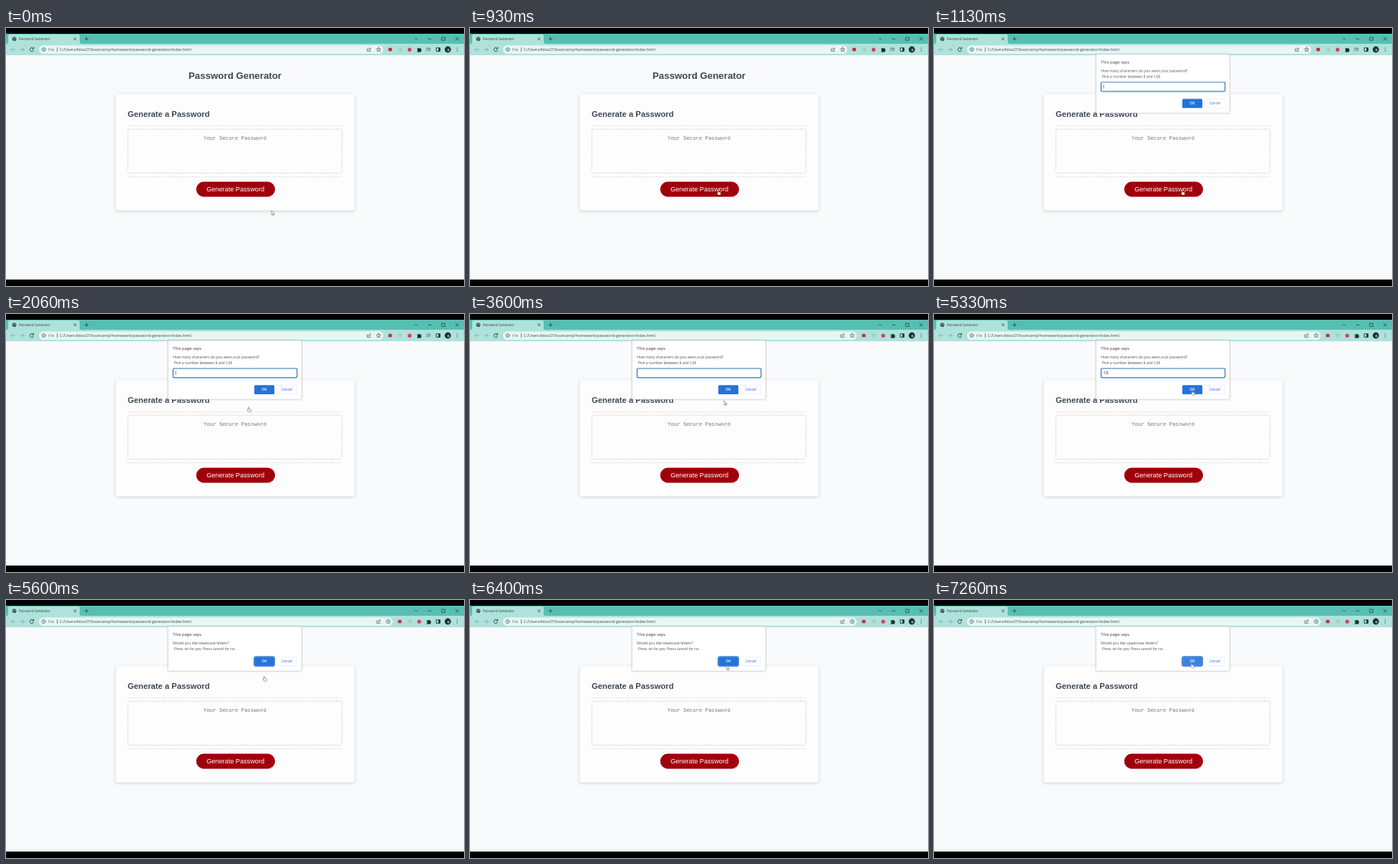
Recreate the animation shown at these times as an HTML page. Size 640 px wide and 360 px high, loop 8000 ms.

```html
<!DOCTYPE html>
<html lang="en">
<head>
<meta charset="utf-8">
<title>Password Generator</title>
<style>
html, body { margin: 0; width: 100%; height: 100%; overflow: hidden; background: #000; }
svg { display: block; width: 640px; height: 360px; }
text { font-family: "Open Sans", "Noto Sans", sans-serif; fill: #33494a; }
.page text { font-family: "Liberation Sans", Arial, sans-serif; fill: #3c4853; }
.page .hint { font: 7.33px "Liberation Mono", monospace; fill: #757575; }
.page .label { font-size: 9.17px; fill: #fff; }
.bold { font-weight: 700; }
.mid { text-anchor: middle; }
.field { fill: #e6f6f4; }
.line { fill: none; stroke: #23423f; stroke-width: .8; stroke-linecap: round; stroke-linejoin: round; }
.dash { fill: none; stroke: #c2c2c2; stroke-width: .75; stroke-dasharray: 1.9 1.2; }
.dialog text { font-size: 5.11px; fill: #484b4f; }
.dialog .says { font-size: 5.96px; fill: #303336; }
.dialog .ok { font-size: 5px; font-weight: 600; fill: #fff; }
.dialog .typed { font-size: 4.7px; }
text.cancel { font-size: 5px; fill: #2266c8; }
.box { fill: #fff; stroke: #d3d6d9; stroke-width: .5; filter: drop-shadow(0 .8px 1.3px rgba(0,0,0,.27)); }

/* One 8 s clock drives every part. */
.a { animation: 8s linear infinite; }
.hard { animation: 8s step-end infinite; }
#dialog { animation-name: open; }
#prompt { animation-name: prompt; }
#confirm { animation-name: confirm; }
#lower { animation-name: lower; }
#upper { animation-name: upper; }
#hover { animation-name: hover; }
#first { animation-name: first; }
#second { animation-name: second; }
#caret { animation-name: caret; }
#media { animation-name: media; }
#tools { animation-name: tools; }
#cursor { animation-name: move; }
#arrow { animation-name: arrow; }
#hand { animation-name: hand; }

@keyframes open {
  0%, 11.7% { opacity: 0; transform: translateY(-1.5px); }
  13.2% { opacity: 1; transform: translateY(-.8px); }
  15%, 100% { opacity: 1; transform: none; }
}
@keyframes prompt { 0% { opacity: 1; } 67.5%, 100% { opacity: 0; } }
@keyframes confirm { 0% { opacity: 0; } 67.5%, 100% { opacity: 1; } }
@keyframes lower { 0% { opacity: 1; } 86.7%, 100% { opacity: 0; } }
@keyframes upper { 0% { opacity: 0; } 86.7%, 100% { opacity: 1; } }
@keyframes hover { 0% { opacity: 0; } 81.6%, 100% { opacity: 1; } }
@keyframes first { 0% { opacity: 0; } 47.5%, 100% { opacity: 1; } }
@keyframes second { 0% { opacity: 0; } 48.25%, 100% { opacity: 1; } }
@keyframes caret {
  0% { opacity: 1; transform: none; }
  18.25% { opacity: 0; }
  25% { opacity: 1; }
  32.5% { opacity: 0; }
  38.25% { opacity: 1; }
  45% { opacity: 0; transform: none; }
  47.5% { opacity: 1; transform: translateX(2.7px); }
  48.25% { opacity: 1; transform: translateX(5.4px); }
  54.9% { opacity: 0; transform: translateX(5.4px); }
  61.6%, 100% { opacity: 1; transform: translateX(5.4px); }
}
@keyframes media { 0% { opacity: 1; } 38.25%, 100% { opacity: 0; } }
@keyframes tools { 0% { transform: none; } 38.25%, 100% { transform: translateX(13.4px); } }
@keyframes move {
  0%, .75% { transform: translate(371px, 255px); }
  6.63%, 21.2% { transform: translate(346px, 226px); }
  25.75% { transform: translate(338px, 129.5px); }
  30%, 53.8% { transform: translate(355px, 121px); }
  58.25% { transform: translate(361.3px, 116px); }
  64.1%, 72.2% { transform: translate(360px, 106.3px); }
  80% { transform: translate(358.3px, 91.2px); }
  83.2%, 100% { transform: translate(359px, 87.6px); }
}
@keyframes arrow {
  0% { opacity: 1; } 4.8% { opacity: 0; } 28% { opacity: 1; } 61.2% { opacity: 0; }
  72.8% { opacity: 1; } 81.2%, 100% { opacity: 0; }
}
@keyframes hand {
  0% { opacity: 0; } 4.8% { opacity: 1; } 28% { opacity: 0; } 61.2% { opacity: 1; }
  72.8% { opacity: 0; } 81.2%, 100% { opacity: 1; }
}
</style>
</head>
<body>
<svg viewBox="0 0 640 360">
  <defs>
    <g id="buttons">
      <rect x="347" y="79.2" width="28" height="12.8" rx="1.6" fill="#2372dc"/>
      <rect x="378.6" y="79.4" width="27.6" height="12.4" rx="1.6" fill="#fff" stroke="#dfe2e6" stroke-width=".5"/>
      <text class="cancel mid" x="392.4" y="87.4">Cancel</text>
    </g>
  </defs>

  <!-- Browser window -->
  <rect width="640" height="360"/>
  <rect y="8" width="640" height="15" fill="#57bfb2"/>
  <rect y="22" width="640" height="16" fill="#aee2da"/>
  <path d="M1 22q2 0 2-2v-9q0-2 2-2h96q2 0 2 2v9q0 2 2 2z" fill="#aee2da"/>
  <rect class="field" x="46" y="24.3" width="481" height="11.6" rx="5.8"/>
  <circle cx="11.6" cy="15.2" r="2.9" fill="#35504e"/>
  <path d="M9.6 14.2l1.6.2.6 1.2-1 1.6M12.2 12.8l.4 1.2 1.4.6" class="line" style="stroke:#aee2da;stroke-width:.6"/>
  <text x="18" y="16.9" font-size="4.6">Password Generator</text>
  <path class="line" d="M95 13.7l3 3m0-3l-3 3M110.3 15.2h4.6m-2.3-2.3v4.6M571.6 14.4l1.6 1.5 1.6-1.5M589.8 15.2h4.2M609.2 13h4.2v4.2h-4.2zM628.3 13l4.2 4.2m0-4.2l-4.2 4.2"/>
  <path class="line" d="M12.4 30H7.4m2.2-2.2L7.4 30l2.2 2.2M20.4 30h5m-2.2-2.2l2.2 2.2-2.2 2.2" style="stroke:#7ba7a2"/>
  <path class="line" d="M38.2 28.6a2.6 2.6 0 1 0 .3 2.2M38.6 27v1.9h-1.9" style="stroke-width:.95"/>
  <circle class="line" cx="52.6" cy="30" r="2.5" style="stroke-width:.6"/>
  <path class="line" d="M52.6 29.8v1.4m0-2.6v.1M71.6 27.4v5.4" style="stroke-width:.6"/>
  <text x="59" y="32" font-size="5.4" style="fill:#64797a">File</text>
  <text x="75" y="32" font-size="5.54">C:/Users/kitov27/bootcamp/homework/password-generator/index.html</text>

  <g id="tools" class="hard">
    <rect class="field" x="490" y="24.3" width="37" height="11.6" rx="5.8"/>
    <path class="line" d="M506 29h-1.4v3.4h4.8v-1M506.4 31q.2-2.4 3-2.4m-1.2-1.3l1.5 1.3-1.5 1.3" style="stroke-width:.6"/>
    <path class="line" d="M520.7 27l.9 2 2.1.2-1.6 1.4.5 2.1-1.9-1.1-1.9 1.1.5-2.1-1.6-1.4 2.1-.2z" style="stroke-width:.65"/>
    <rect x="534.4" y="27.8" width="4.8" height="4.4" fill="#c4293c"/>
    <rect x="548.6" y="27.4" width="4.4" height="5.2" rx=".6" fill="#a0cfc9"/>
    <circle cx="564" cy="30.2" r="2.6" fill="#d63b54"/>
    <path d="M574.6 28.4h1.7a1.1 1.1 0 0 1 2.1 0h1.6v1.7a1.1 1.1 0 0 1 0 2v1.5h-5.4v-1.6a1 1 0 0 0 0-1.9z" fill="#182f2e"/>
  </g>
  <path id="media" class="line hard" d="M587.6 28h4.6M587.6 29.8h4.6M587.6 31.6h2.4M592 32v-3.6h1.4" style="stroke:#53837f"/>
  <rect class="line" x="601.6" y="27.7" width="5" height="4.7" style="stroke-width:1"/>
  <rect x="604.3" y="27.7" width="2.4" height="4.7" fill="#182f2e"/>
  <circle cx="617.4" cy="30" r="4.4" fill="#202a33"/>
  <circle cx="618.2" cy="30.8" r="1.7" fill="#8b949b"/>
  <path d="M630.5 27.9v.01M630.5 30v.01M630.5 32.1v.01" class="line" style="stroke-width:1.1"/>

  <!-- Web page -->
  <rect y="38" width="640" height="313" fill="#f9fafc"/>
  <g class="page">
    <text class="bold mid" x="320" y="71.4" font-size="13.3">Password Generator</text>
    <rect x="153.5" y="92" width="333.5" height="162.5" rx="2" fill="#fdfdfe" style="filter:drop-shadow(0 1px 2px rgba(40,50,60,.22))"/>
    <text class="bold" x="170" y="124" font-size="11.28">Generate a Password</text>
    <path class="dash" d="M170 136.5h299M170 207.6h299" style="stroke:#cfcfcf;stroke-width:.65"/>
    <rect class="dash" x="170.3" y="141.2" width="299.2" height="61.4" rx="2.4"/>
    <text class="hint mid" x="320" y="155.6">Your Secure Password</text>
    <rect x="265.8" y="214.6" width="110.2" height="20.8" rx="10.4" fill="#a0000b"/>
    <text class="label mid" x="320.6" y="228.2">Generate Password</text>
  </g>

  <!-- Dialogs -->
  <g id="dialog" class="dialog a">
    <g id="prompt" class="hard">
      <rect class="box" x="226.6" y="37" width="186.4" height="82" rx="1.6"/>
      <text class="says" x="233.2" y="50.3">This page says</text>
      <text x="233.2" y="61.8">How many characters do you want your password?</text>
      <text x="235" y="70.4">Pick a number between 8 and 128</text>
      <rect x="233.5" y="76" width="173.2" height="12.8" rx="1.2" fill="#fff" stroke="#2a70bd" stroke-width="1.2"/>
      <text id="first" class="typed hard" x="236.8" y="84.2">3</text>
      <text id="second" class="typed hard" x="239.5" y="84.2">3</text>
      <rect id="caret" class="hard" x="236.8" y="79.3" width=".6" height="5.8" fill="#333"/>
      <g transform="translate(0 20)">
        <use href="#buttons"/>
        <text class="ok mid" x="360.8" y="87.4">OK</text>
      </g>
    </g>
    <g id="confirm" class="hard">
      <rect class="box" x="226.6" y="37" width="186.4" height="62" rx="1.6"/>
      <text class="says" x="233.2" y="50.3">This page says</text>
      <text id="lower" class="hard" x="233.2" y="61.8">Would you like lowercase letters?</text>
      <text id="upper" class="hard" x="233.2" y="61.8">Would you like uppercase letters?</text>
      <text x="235" y="70.4">Press ok for yes. Press cancel for no.</text>
      <use href="#buttons"/>
      <rect id="hover" class="hard" x="347" y="79.2" width="28" height="12.8" rx="1.6" fill="#3b82e0"/>
      <rect x="347.4" y="79.6" width="27.2" height="12" rx="1.4" fill="none" stroke="#8fb9f0" stroke-width=".4"/>
      <rect x="346.6" y="78.8" width="28.8" height="13.6" rx="2" fill="none" stroke="#1c5fbd" stroke-width=".9"/>
      <text class="ok mid" x="360.8" y="87.4">OK</text>
    </g>
  </g>

  <!-- Pointer -->
  <g id="cursor" class="a" fill="#fff" stroke="#444" stroke-width=".5" stroke-linejoin="round">
    <path id="arrow" class="hard" d="M0 0v6l1.4-1.3.9 2.1.9-.4-.9-2h2z"/>
    <path id="hand" class="hard" d="M.2.5q.6-.8 1.1 0v2.3l2.5.5q.7.2.7.9l-.5 2.9H.9L-1 4.6q-.2-.8.6-.7l.6.5z"/>
  </g>
</svg>
</body>
</html>
```
